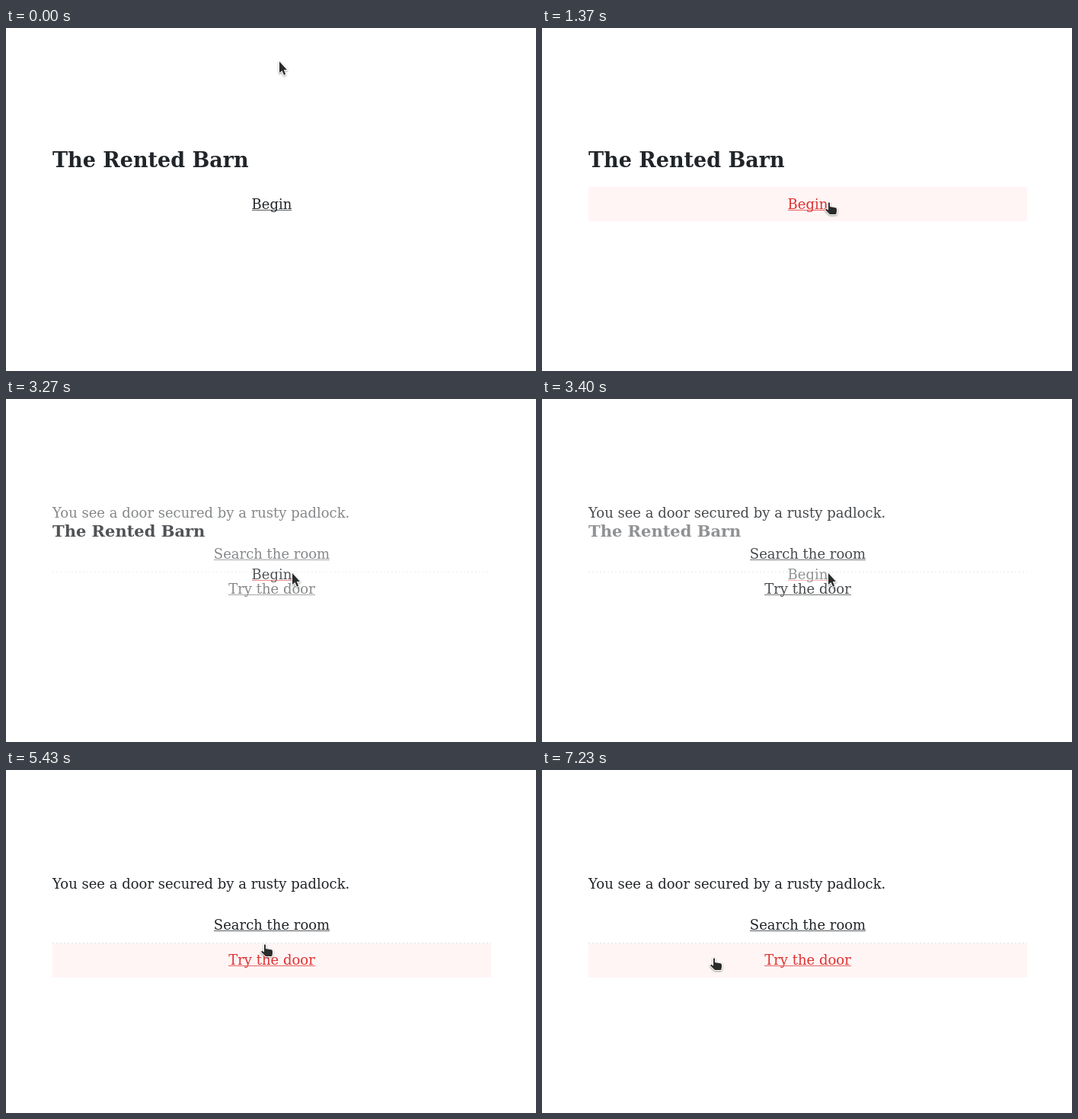
Write an HTML page that moves like this. It is 696x451 px and loops after 8000 ms.

```html
<!DOCTYPE html>
<html lang="en">
<head>
<meta charset="utf-8">
<title>The Rented Barn</title>
<style>
html, body { margin: 0; width: 100%; height: 100%; overflow: hidden; background: #fff; }
svg { display: block; }
text { font: 18px "DejaVu Serif", serif; fill: #212529; }
.mid { text-anchor: middle; }
.line { fill: #212529; opacity: .75; }
.bg { fill: #fff5f5; visibility: hidden; }
.hover .bg { visibility: visible; }
.hover text, .hover .line, .leaving .line { fill: #e03131; }
#title { font-weight: bold; }
.cursor path { fill: #2b2b2b; stroke: #fff; stroke-width: 2px; paint-order: stroke; stroke-linejoin: round; }
.cursor { filter: drop-shadow(0 1px 1px rgba(0, 0, 0, .4)); }
</style>
</head>
<body>
<svg width="696" height="451" viewBox="0 0 696 451">
  <g id="start">
    <text id="title" x="61" y="183">The Rented Barn</text>
    <g id="begin">
      <rect class="bg" x="61" y="209" width="576" height="45"/>
      <text class="mid" x="349" y="238">Begin</text>
      <rect class="line" x="323" y="239" width="52" height="1"/>
    </g>
  </g>
  <g id="room">
    <text x="61" y="156">You see a door secured by a rusty padlock.</text>
    <g id="search">
      <rect class="bg" x="61" y="182" width="576" height="46"/>
      <text class="mid" x="349" y="210">Search the room</text>
      <rect class="line" x="273" y="211" width="152" height="1"/>
    </g>
    <g id="door">
      <rect class="bg" x="61" y="228" width="576" height="45"/>
      <text class="mid" x="349" y="256">Try the door</text>
      <rect class="line" x="292" y="257" width="114" height="1"/>
    </g>
    <path d="M61 227.5H637" stroke="#dee2e6" stroke-dasharray="2 3"/>
  </g>
  <g id="arrow" class="cursor"><path d="M0 0V15L3.5 12L6 17.8L8.2 16.8L5.8 11H10Z"/></g>
  <g id="hand" class="cursor"><path d="M0 1Q1-.7 2 1V6L9.5 7.3Q11 7.8 11 9.3V12.5L10 16H2L-3.6 10.5Q-4 8.4-2.2 9L0 10.5Z"/></g>
</svg>
<script>
const $ = id => document.getElementById(id);
const LOOP = 8000, CLICK = 3100, FADE = 480, READY = 3630;

// start, end, then a quadratic curve: from, control, to
const moves = [
  [730, 1370, 359, 44, 400, 130, 376, 229],
  [5420, 5430, 376, 229, 357, 229, 339, 229],
  [5500, 5670, 339, 229, 297, 229, 255, 229],
  [6000, 6100, 255, 229, 255, 220, 257, 210],
  [6970, 7230, 257, 210, 215, 224, 225, 247]
];

function pointer(t) {
  const [t0, t1, x0, y0, cx, cy, x1, y1] = moves.findLast(m => t >= m[0]) || moves[0];
  const p = Math.max(0, Math.min(1, (t - t0) / (t1 - t0)));
  const u = p * p * (3 - 2 * p);
  const curve = (a, b, c) => a * (1 - u) ** 2 + 2 * b * u * (1 - u) + c * u * u;
  return [Math.round(curve(x0, cx, x1)), Math.round(curve(y0, cy, y1))];
}

function show(id, opacity) {
  $(id).style.opacity = opacity;
}

function draw(t) {
  const [x, y] = pointer(t);
  const left = t >= CLICK;
  const p = Math.max(0, Math.min(1, (t - CLICK) / FADE));

  let hovered = null;
  if (!left) hovered = y >= 209 ? "begin" : null;
  else if (t >= READY) hovered = y < 228 ? "search" : "door";
  for (const id of ["begin", "search", "door"])
    $(id).classList.toggle("hover", id === hovered);

  $("begin").classList.toggle("leaving", left);
  $("begin").setAttribute("transform", `translate(0 ${left ? -1 : 0})`);
  $("title").style.fontSize = left ? "21px" : "27px";
  $("title").setAttribute("y", left ? 181 : 183);
  show("start", 1 - p ** 1.5);
  show("room", 1 - (1 - p) ** 1.8);

  for (const id of ["arrow", "hand"]) {
    $(id).setAttribute("transform", `translate(${x} ${y})`);
    show(id, (id === "hand") === !!hovered ? 1 : 0);
  }
}

function tick() {
  draw(performance.now() % LOOP);
  requestAnimationFrame(tick);
}
tick();
</script>
</body>
</html>
```
